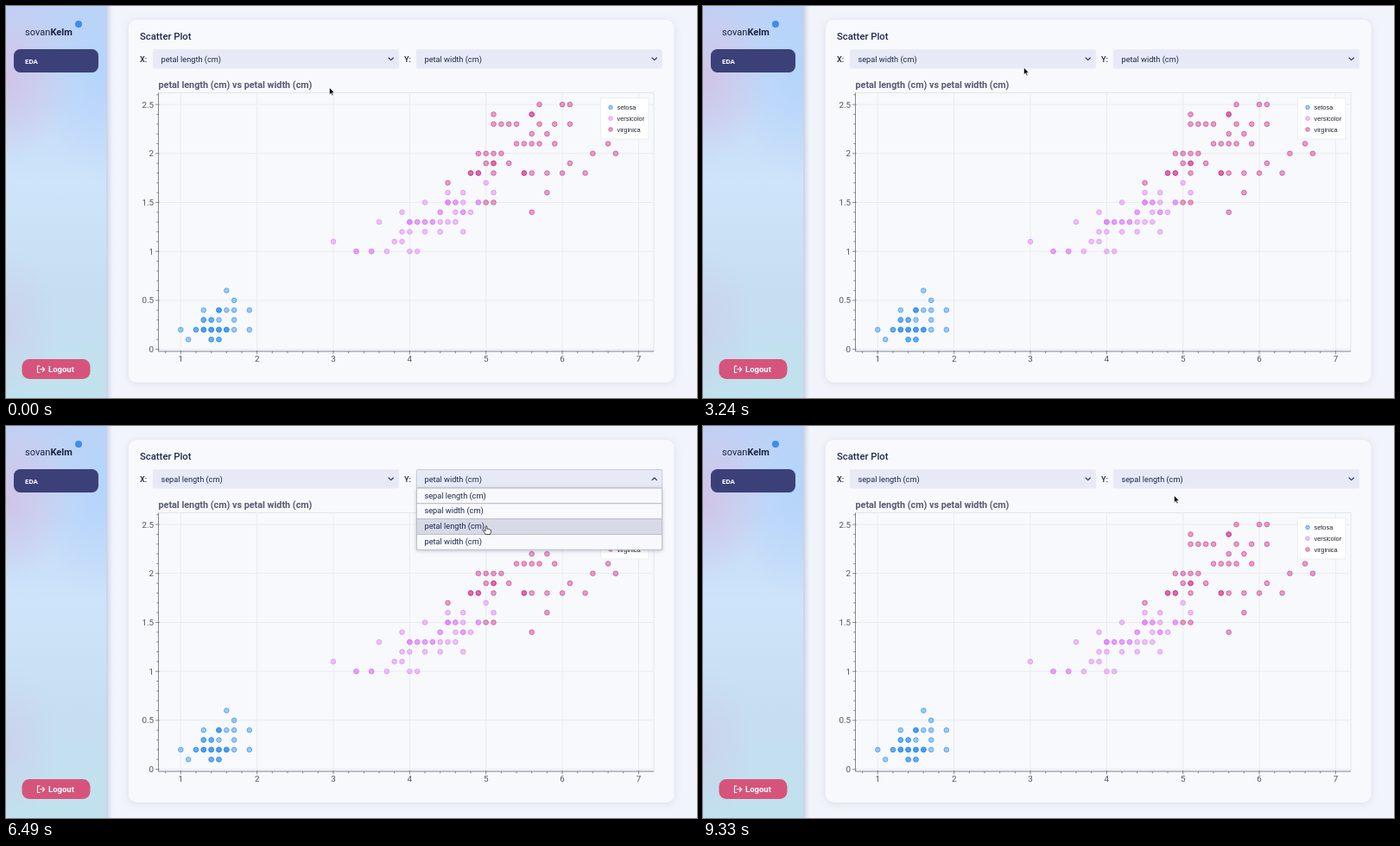
Recreate the animation shown at these times as an HTML page. Size 800 by 454 pixels, loop 9.36 s.

```html
<!DOCTYPE html>
<html lang="en">
<head>
<meta charset="utf-8">
<title>Scatter Plot</title>
<style>
html, body { margin: 0; width: 100%; height: 100%; overflow: hidden; background: #f2f4fb; }
svg { display: block; width: 800px; height: 454px; font-family: Roboto, Inter, sans-serif; }
.ui { font-size: 9.2px; fill: #20284f; }
.axis { font-size: 9.8px; fill: #4d5468; }
.grid { stroke: #e9ecef; }
.tick { stroke: #596175; stroke-width: .7; }
.legend { font: 7.4px "Liberation Sans", Arial, sans-serif; fill: #20222c; }
.line { fill: none; stroke: #2a315a; stroke-width: 1.1; stroke-linecap: round; stroke-linejoin: round; }
.card { filter: drop-shadow(0 1px 4px rgba(60, 80, 130, .13)); }
.list { filter: drop-shadow(0 1px 2px rgba(40, 50, 90, .28)); }
</style>
</head>
<body>
<svg viewBox="0 0 800 454">
  <defs>
    <linearGradient id="side" x2="0" y2="1">
      <stop offset="0" stop-color="#bfd0f5"/>
      <stop offset=".45" stop-color="#cde4fa"/>
      <stop offset=".75" stop-color="#c6def1"/>
      <stop offset="1" stop-color="#c0e2ed"/>
    </linearGradient>
    <radialGradient id="lilac">
      <stop offset="0" stop-color="#d0c4e7"/>
      <stop offset="1" stop-color="#d0c4e7" stop-opacity="0"/>
    </radialGradient>
    <radialGradient id="sky">
      <stop offset="0" stop-color="#b4d5fb"/>
      <stop offset="1" stop-color="#b4d5fb" stop-opacity="0"/>
    </radialGradient>
    <linearGradient id="edge">
      <stop offset="0" stop-color="#a9b6d2" stop-opacity=".6"/>
      <stop offset="1" stop-color="#c9d2e6" stop-opacity="0"/>
    </linearGradient>
    <clipPath id="bar"><rect width="116" height="454"/></clipPath>
  </defs>

  <rect width="800" height="454" fill="#f2f4fb"/>
  <rect x="116" width="8" height="454" fill="url(#edge)"/>
  <g clip-path="url(#bar)">
    <rect width="116" height="454" fill="url(#side)"/>
    <ellipse cx="112" cy="70" rx="80" ry="130" fill="url(#sky)"/>
    <ellipse cx="0" cy="85" rx="75" ry="95" fill="url(#lilac)"/>
    <ellipse cx="0" cy="370" rx="60" ry="90" fill="url(#lilac)" opacity=".45"/>
  </g>
  <circle cx="84" cy="21" r="4" fill="#3d8eea"/>
  <text x="22" y="34" font-size="11.1" fill="#1c2340">sovan<tspan font-weight="700">Kelm</tspan></text>
  <rect x="9" y="50" width="98" height="27" rx="7.5" fill="#3b4079"/>
  <text x="22" y="66.5" font-size="8" font-weight="700" fill="#fff">EDA</text>
  <rect x="18.5" y="409" width="79" height="23" rx="8.5" fill="#d6547b"/>
  <path d="M39 417h-1.5q-1.300-1.300 1.300v5q0 1.300 1.300 1.300h1.500M39.500 420.800h5M42.300 418.300l2.500 2.500-2.500 2.500" class="line" style="stroke:#fff" visibility="hidden"/>
  <path d="M39 417H36.500V424.500H39M39.500 420.800H44.500M42.300 418.300L44.800 420.800L42.300 423.300" class="line" style="stroke:#fff"/>
  <text x="49" y="424" font-size="9.5" font-weight="700" fill="#fff">Logout</text>

  <rect class="card" x="142" y="16" width="631.5" height="420" rx="9" fill="#f7f9fc"/>
  <text x="155" y="39" font-size="11.3" font-weight="500" fill="#20284f">Scatter Plot</text>
  <text x="155" y="65" class="ui" font-weight="500">X:</text>
  <text x="461" y="65" class="ui" font-weight="500">Y:</text>

  <text x="176.500" y="95.300" font-size="10.800" font-weight="700" fill="#575a73">petal length (cm) vs petal width (cm)</text>
  <g id="plot"></g>
  <g id="menus"></g>
  <g id="cursor">
    <path id="arrow" d="M0 0V8.200L1.900 6.500L3.200 9.300L4.500 8.700L3.200 6H5.700Z" fill="#000" stroke="#fff" stroke-width=".6"/>
    <path id="hand" d="M-.9 .8Q0-.7 .9 .8V4Q2 3 2.700 4.200Q3.800 3.500 4.300 4.700Q5.500 4.300 5.500 5.700V7.200L4.500 10H-.8Q-1.500 8.300-3.200 6.300Q-3.200 4.900-1.900 5.300L-.9 6.300Z" fill="#fff" stroke="#222" stroke-width=".8" stroke-linejoin="round"/>
  </g>
</svg>
<script>
const LOOP = 9360;
const $ = id => document.getElementById(id);

function add(parent, tag, attrs, text) {
  const el = document.createElementNS("http://www.w3.org/2000/svg", tag);
  for (const k in attrs) el.setAttribute(k, attrs[k]);
  if (text) el.textContent = text;
  parent.append(el);
  return el;
}

// Plot: keys are petal widths, values petal lengths, both in millimetres.
const species = [
  { name: "setosa", color: "#2f8ded", rows: {
    1: [11, 14, 14, 15, 15],
    2: [10, 12, 12, 13, 13, 13, 14, 14, 14, 15, 15, 15, 16, 16, 16, 17, 19],
    3: [13, 13, 14, 14, 15, 17], 4: [13, 15, 15, 15, 16, 17, 19], 5: [17], 6: [16] } },
  { name: "versicolor", color: "#dd7cfa", rows: {
    10: [33, 33, 35, 35, 37, 40, 41], 11: [30, 38, 39], 12: [39, 40, 42, 44, 47],
    13: [36, 40, 40, 40, 41, 41, 42, 42, 43, 43, 44, 45, 46], 14: [39, 44, 44, 46, 47, 47, 48],
    15: [42, 45, 45, 45, 46, 46, 47, 49, 49], 16: [45, 47, 51], 17: [50] } },
  { name: "virginica", color: "#cd3388", rows: {
    14: [56], 15: [50, 51], 16: [58], 17: [45],
    18: [48, 48, 49, 49, 51, 55, 55, 56, 58, 60, 63], 19: [50, 51, 51, 53, 61],
    20: [49, 50, 51, 52, 64, 67], 21: [54, 55, 56, 57, 59, 66], 22: [56, 58],
    23: [51, 52, 53, 54, 57, 59, 61], 24: [51, 56, 56], 25: [57, 60, 61] } }
];
const px = v => 202.3 + (v - 1) * 88.35;
const py = v => 397.6 - v * 113.4;
const plot = $("plot");
const line = (x1, y1, x2, y2, cls) => add(plot, "line", { x1, y1, x2, y2, class: cls });
const dot = (cx, cy, r, c) => add(plot, "circle", {
  cx, cy, r, fill: c, "fill-opacity": .45, stroke: c, "stroke-opacity": .8, "stroke-width": .8 });

add(plot, "rect", { x: 176.5, y: 100.5, width: 573.5, height: 299.5, fill: "none", stroke: "#e3e6ea" });
for (let i = 1; i <= 7; i++) line(px(i), 100.5, px(i), 400, "grid");
for (let i = 0; i <= 5; i++) line(176.5, py(i / 2), 750, py(i / 2), "grid");
line(176.5, 100.5, 176.5, 400, "tick");
line(176.5, 400, 750, 400, "tick");
for (let i = 4; i <= 35; i++) {
  const major = i % 5 === 0, x = px(i / 5);
  line(x, major ? 399 : 400, x, major ? 403.4 : 402.3, "tick");
  if (major) add(plot, "text", { x, y: 412.3, class: "axis", "text-anchor": "middle" }, String(i / 5));
}
for (let i = 0; i <= 26; i++) {
  const major = i % 5 === 0, y = py(i / 10);
  line(major ? 173 : 174.2, y, major ? 177.5 : 176.5, y, "tick");
  if (major) add(plot, "text", { x: 171, y: y + 3.5, class: "axis", "text-anchor": "end" }, String(i / 10));
}
for (const s of species)
  for (const w in s.rows)
    for (const l of s.rows[w]) dot(px(l / 10), py(w / 10), 2.8, s.color);
add(plot, "rect", { x: 688.5, y: 106.5, width: 55.5, height: 47.5, fill: "#fff", "fill-opacity": .95, stroke: "#eceef1" });
species.forEach((s, i) => {
  const y = 117.4 + i * 12.8;
  dot(700, y, 2.3, s.color);
  add(plot, "text", { x: 707.5, y: y + 2.5, class: "legend" }, s.name);
});

// Dropdowns
const options = ["sepal length (cm)", "sepal width (cm)", "petal length (cm)", "petal width (cm)"];
const TOP = 72, ROW = 17.8;

function makeMenu(x) {
  const g = add($("menus"), "g", {});
  const box = add(g, "rect", { x: x + .3, y: 50.5, width: 284.4, height: 21.5, rx: 1.5, "stroke-width": .8 });
  const label = add(g, "text", { x: x + 9.5, y: 64.8, class: "ui" });
  const chevron = add(g, "path", { class: "line" });
  const list = add(g, "g", { class: "list" });
  const rows = options.map((name, i) => {
    const y = TOP + i * ROW;
    const r = add(list, "rect", { x: x + .4, y, width: 284.2, height: ROW, stroke: "#b3b7c4", "stroke-width": .8 });
    add(list, "text", { x: x + 9.5, y: y + 11.5, class: "ui" }, name);
    return r;
  });
  return { x, box, label, chevron, list, rows };
}

function drawMenu(m, value, open, cx, cy) {
  const inside = cx >= m.x && cx <= m.x + 285;
  const hover = !open && inside && cy > 50 && cy < 71;
  const item = open && inside ? Math.floor((cy - TOP) / ROW) : -1;
  m.box.setAttribute("fill", hover ? "#d6d9e6" : "#e7eaf6");
  m.box.setAttribute("stroke", hover || open ? "#b9bece" : "#e7eaf6");
  m.label.textContent = options[value];
  const d = open ? -1.3 : 1.3;
  m.chevron.setAttribute("d", `M${m.x + 273} ${61.3 - d}l2.7 ${2 * d}l2.7 ${-2 * d}`);
  m.list.style.display = open ? "" : "none";
  m.rows.forEach((r, i) => r.setAttribute("fill", i === item ? "#d8d9e7" : "#f7f9fc"));
  return item >= 0 && item < options.length;
}

const menuX = makeMenu(170), menuY = makeMenu(475);

// Pointer stops: time, x, y
const path = [
  [0, 374.5, 94.5], [300, 374.5, 94.5], [800, 380, 66], [1200, 380, 66], [1600, 384, 85],
  [2210, 387, 111.5], [2500, 385, 112], [2850, 378, 99], [3050, 377, 97], [3240, 371.5, 71.2],
  [3400, 371, 64], [3500, 371, 64], [3800, 375, 79], [4000, 376, 79], [4580, 570, 65.5],
  [4800, 572, 62], [5000, 572, 62], [5300, 570, 85], [5900, 560, 133], [6490, 556, 115.5],
  [7300, 556, 103], [7850, 555.5, 102.5], [8250, 550, 64], [8400, 550, 64],
  [8850, 545.5, 80.5], [LOOP, 545.5, 80.5]
];

function pointer(t) {
  const i = path.findIndex(p => p[0] > t);
  const [t0, x0, y0] = path[i - 1], [t1, x1, y1] = path[i];
  const u = (t - t0) / (t1 - t0), k = u * u * (3 - 2 * u);
  return [x0 + (x1 - x0) * k, y0 + (y1 - y0) * k];
}

const between = (t, a, b) => t >= a && t < b;

function draw(now) {
  const t = now % LOOP, [x, y] = pointer(t);
  const openX = between(t, 1050, 2950) || between(t, 3480, 3880);
  const openY = between(t, 5000, 7500) || between(t, 8400, 9150);
  const onX = drawMenu(menuX, t < 2950 ? 2 : t < 3880 ? 1 : 0, openX, x, y);
  const onY = drawMenu(menuY, t < 7500 ? 3 : t < 9150 ? 1 : 0, openY, x, y);
  $("cursor").setAttribute("transform", `translate(${x} ${y})`);
  $("hand").style.display = onX || onY ? "" : "none";
  $("arrow").style.display = onX || onY ? "none" : "";
}

let start;
function frame(now) {
  start ??= now;
  draw(now - start);
  requestAnimationFrame(frame);
}
draw(0);
requestAnimationFrame(frame);
</script>
</body>
</html>
```
